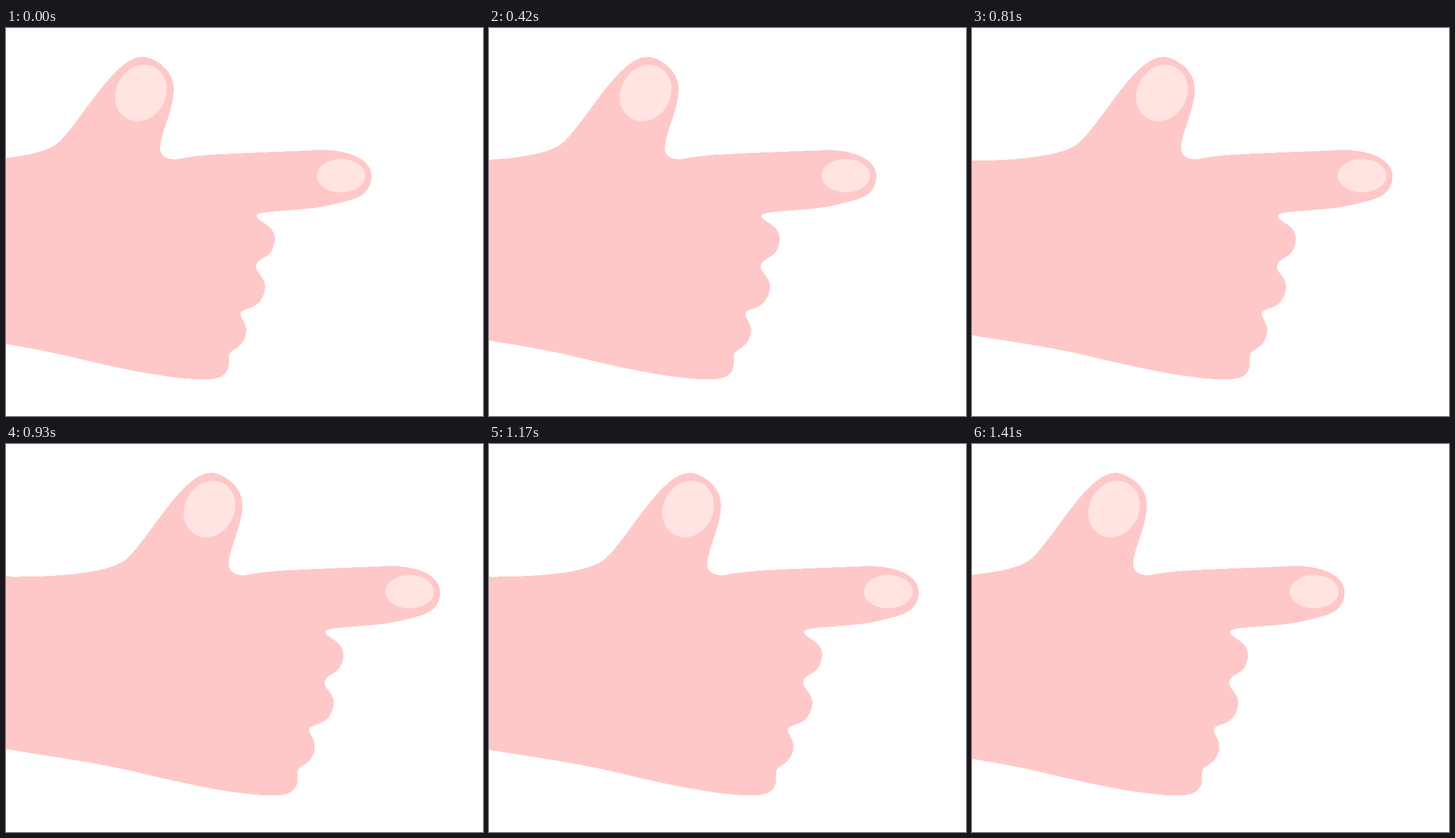
An HTML page that plays this animation: 830x674 px, repeating every 1.44 s.

```html
<!DOCTYPE html>
<html lang="en">
<head>
<meta charset="utf-8">
<title>Pointing hand</title>
<style>
  html, body { margin: 0; width: 100%; height: 100%; overflow: hidden; background: #fff; }
  svg { display: block; width: 100%; height: 100%; }
</style>
</head>
<body>
<svg viewBox="0 0 830 674">
  <g id="hand">
    <path fill="#ffc8c8" shape-rendering="crispEdges" d="
      M-160 230 L-110 230.5 C-40 231 52 226 86 203
      C104 191 137 141 163 108 C190 74 214 50 238 50
      C253 50 292 69 292 106 C292 143 268 182 268 209
      C268 221 278 228 293 228 C305 228 315 221 400 218
      C440 216 500 214 547 212 C596 211 636 228 636 257
      C636 277 625 290 605 297 C575 306 545 313 512 315
      C480 318 436 319 436 326 C436 337 468 341 468 366
      C468 376 463 390 455 395 C447 401 435 404 435 415
      C435 425 451 433 451 450 C451 460 445 475 434 482
      C424 488 408 489 408 497 C408 502 418 514 418 525
      C418 535 413 547 405 553 C397 560 388 561 388 570
      C387 580 389 588 385 595 C380 604 371 610.5 345 610.5
      C285 610.5 190 590 104 569 C70 561 30 554 0 549
      L-160 523.5 Z"/>
    <g fill="#ffe4e2">
      <ellipse rx="43.1" ry="50.7" transform="translate(234.7 113) rotate(29)"/>
      <ellipse cx="583" cy="256.5" rx="42.5" ry="29"/>
    </g>
  </g>
</svg>
<script>
  const LOOP = 1440, STEP = 30;
  // [time in ms, horizontal shift], linear in between
  const keys = [[0, 0], [600, 54.2], [1080, 149], [LOOP, 0]];
  const hand = document.getElementById('hand');

  function shiftAt(t) {
    const i = keys.findIndex(([end]) => t < end);
    const [t0, x0] = keys[i - 1], [t1, x1] = keys[i];
    return x0 + (x1 - x0) * (t - t0) / (t1 - t0);
  }

  const start = performance.now();
  function draw() {
    const t = (performance.now() - start) % LOOP;
    const shift = shiftAt(Math.floor(t / STEP) * STEP);
    hand.setAttribute('transform', `translate(${shift} 0)`);
    requestAnimationFrame(draw);
  }
  draw();
</script>
</body>
</html>
```
